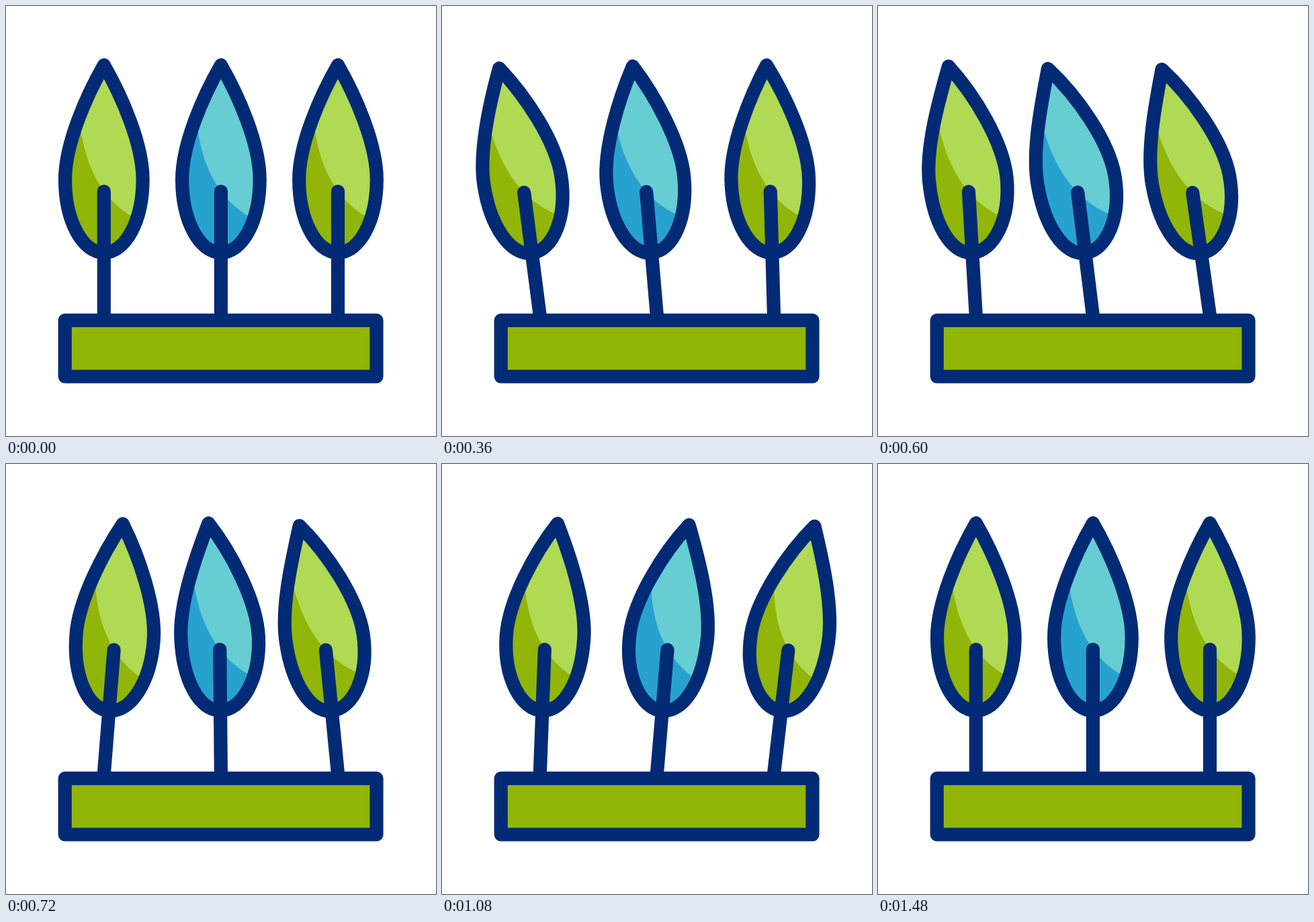
An HTML page with a canvas that plays this animation: 640x640 px, repeating every 1640 ms.

```html
<!DOCTYPE html>
<html lang="en">
<head>
<meta charset="utf-8">
<title>Swaying trees</title>
<style>
  html, body { margin: 0; height: 100%; overflow: hidden; background: #fff; }
  canvas { display: block; width: 100vw; height: 100vh; }
</style>
</head>
<body>
<canvas id="stage" width="640" height="640"></canvas>
<script>
const ctx = document.getElementById('stage').getContext('2d');
const LOOP = 1640, STEP = 40, PIVOT = 461;
const NAVY = '#032b75', GREEN = '#91b508', LIME = '#b0d954', BLUE = '#27a2cf', AQUA = '#66cdd2';

const trees = [
  { x: 145.8, delay: 0, settle: 400, dark: GREEN, light: LIME },
  { x: 319.9, delay: 80, settle: 400, dark: BLUE, light: AQUA },
  { x: 494, delay: 160, settle: 440, dark: GREEN, light: LIME }
];

// cubic-bezier(.5, 0, .5, 1), solved by bisection
function ease(u) {
  let lo = 0, hi = 1;
  for (let i = 0; i < 24; i++) {
    const s = (lo + hi) / 2;
    if (1.5 * s * (1 - s) + s ** 3 < u) lo = s; else hi = s;
  }
  return lo * lo * (3 - 2 * lo);
}

// Eased value at time t through a list of [time, value] keys
function track(t, keys) {
  if (t <= keys[0][0]) return keys[0][1];
  for (let i = 1; i < keys.length; i++) {
    const [t0, a] = keys[i - 1], [t1, b] = keys[i];
    if (t < t1) return a + (b - a) * ease((t - t0) / (t1 - t0));
  }
  return keys[keys.length - 1][1];
}

// Leaf outline around x = 0; bend shifts the tip sideways and leans the flanks
function leafPath(bend) {
  const pull = bend * 0.45, lean = bend * 0.13;
  const p = new Path2D();
  p.moveTo(bend, 88);
  p.bezierCurveTo(26 + pull, 133, 57.8 + lean, 205, 57.8, 258);
  p.bezierCurveTo(57.8 - lean, 320, 32, 367, 0, 367);
  p.bezierCurveTo(-32, 367, -57.8 - lean, 320, -57.8, 258);
  p.bezierCurveTo(-57.8 + lean, 205, -26 + pull, 133, bend, 88);
  p.closePath();
  return p;
}

function lightPath(bend) {
  const shift = bend * 0.15;
  const p = new Path2D();
  p.moveTo(84, 335);
  p.lineTo(44, 314.7);
  p.quadraticCurveTo(-21, 278, -35 + shift, 182);
  p.lineTo(-41 + shift, 140);
  p.lineTo(-60, 60);
  p.lineTo(100, 60);
  p.closePath();
  return p;
}

function drawTree({ x, delay, settle, dark, light }, time) {
  const t = time - delay;
  const angle = track(t, [[80, 0], [440, -8], [840, 7], [840 + settle, 0]]);
  const bend = track(t, [[160, 0], [520, -21.5], [920, 17.5], [1320, 0]]);
  const leaf = leafPath(bend);

  ctx.save();
  ctx.translate(x, PIVOT);
  ctx.rotate(angle * Math.PI / 180);
  ctx.translate(0, -PIVOT);

  ctx.fillStyle = dark;
  ctx.fill(leaf);
  ctx.save();
  ctx.clip(leaf);
  ctx.fillStyle = light;
  ctx.fill(lightPath(bend));
  ctx.restore();
  ctx.stroke(leaf);

  ctx.beginPath();
  ctx.moveTo(0, 276);
  ctx.lineTo(0, 468);
  ctx.stroke();
  ctx.restore();
}

function drawBase() {
  const box = [87.7, 467.8, 463.8, 83.7];
  ctx.fillStyle = GREEN;
  ctx.fillRect(...box);
  ctx.strokeRect(...box);
}

function draw(time) {
  ctx.fillStyle = '#fff';
  ctx.fillRect(0, 0, 640, 640);
  ctx.strokeStyle = NAVY;
  ctx.lineWidth = 20.2;
  ctx.lineJoin = ctx.lineCap = 'round';
  for (const tree of trees) drawTree(tree, time);
  drawBase();
}

const start = performance.now();
function tick() {
  const t = (performance.now() - start) % LOOP;
  draw(Math.floor(t / STEP) * STEP);
  requestAnimationFrame(tick);
}
tick();
</script>
</body>
</html>
```
